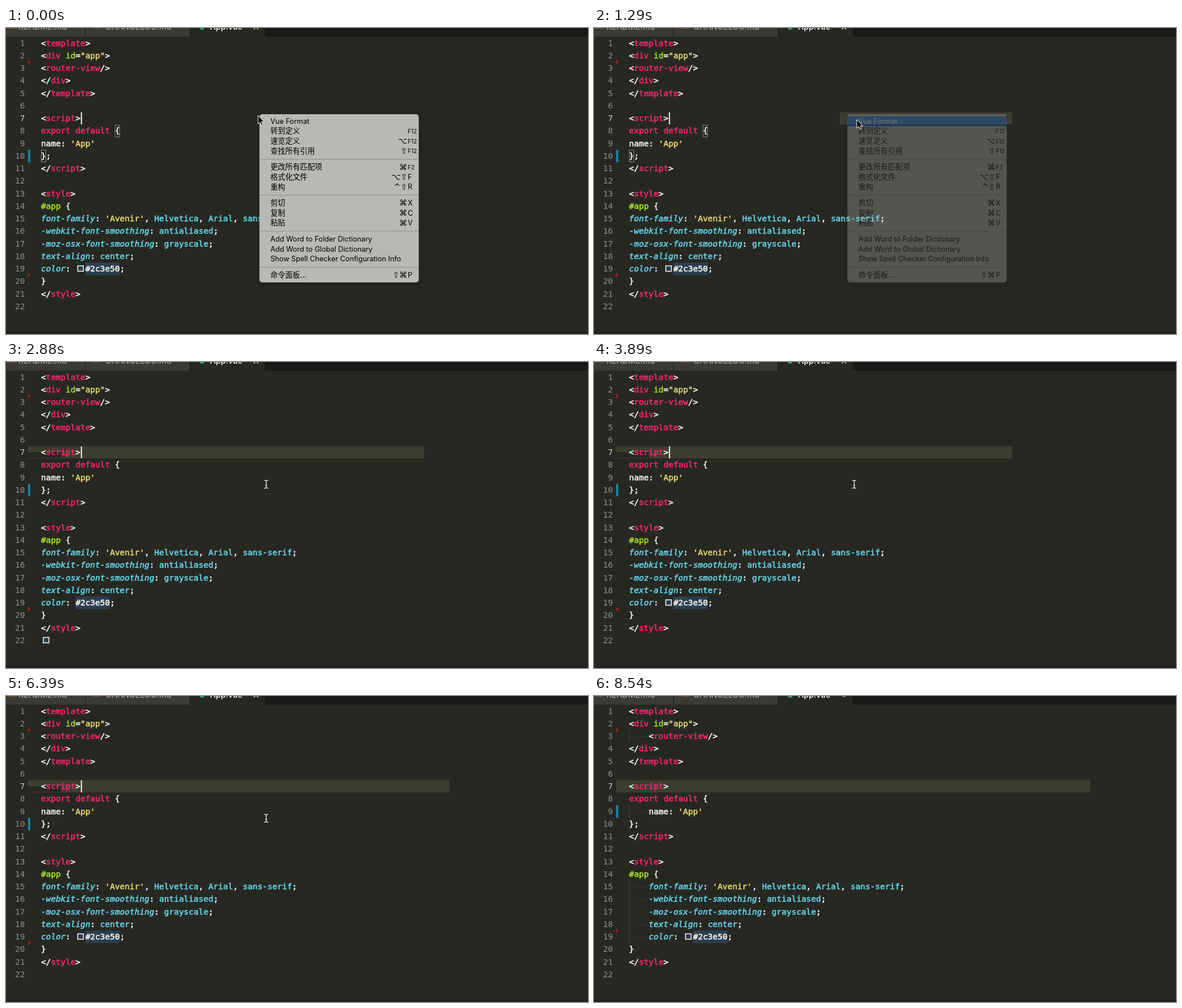
An HTML page for the animation above (8640 ms loop, 1030 px wide and 543 px high).

```html
<!DOCTYPE html>
<html lang="zh">
<head>
<meta charset="utf-8">
<title>Editor formatting</title>
<style>
html, body { margin: 0; width: 100%; height: 100%; overflow: hidden; background: #272822; }
svg { display: block; width: 1030px; height: 543px; }
text { white-space: pre; }
.code { font: 14.47px "DejaVu Sans Mono", monospace; stroke-width: .55px; }
.num { font: 14.47px "DejaVu Sans Mono", monospace; fill: #8f908a; text-anchor: end; }
.tab { font: 500 14.3px Inter, sans-serif; }
.ui { font: 12.65px Inter, sans-serif; }
.cjk { font: 13.1px "Noto Sans CJK SC", "Noto Sans CJK", sans-serif; }
.mod { font: 14px "DejaVu Sans", sans-serif; text-anchor: end; }
.fkey { font: 10px Inter, sans-serif; }
.w { fill: #f8f8f2; stroke: #f8f8f2 }
.p { fill: #f92672; stroke: #f92672 }
.g { fill: #a6e22e; stroke: #a6e22e }
.y { fill: #e6db74; stroke: #e6db74 }
.b, .i { fill: #66d9ef; stroke: #66d9ef }
.i { font-style: italic }
</style>
</head>
<body>
<svg viewBox="0 0 1030 543">
  <rect y="538" width="1030" height="5" fill="#22231e"/>
  <rect width="1030" height="15.5" fill="#191a17"/>
  <rect width="140" height="15.5" fill="#3a3b35"/>
  <rect x="141" width="184" height="15.5" fill="#3a3b35"/>
  <rect x="326" width="132" height="16" fill="#272822"/>
  <path d="M3 0H16M155 0H168" stroke="#8a5a3c" stroke-width="2"/>
  <circle cx="347" cy="-1" r="4" fill="#3aa579"/>
  <g class="tab" fill="#a3a49c">
    <text x="22" y="2.6">README.md</text>
    <text x="176" y="2.6">CHANGELOG.md</text>
    <text x="361" y="2.6" fill="#fff">App.vue</text>
  </g>
  <path id="close" d="M438.5 2.5L446.5-5.5M446.5 2.5L438.5-5.5" stroke="#d0d0ca" stroke-width="1.5"/>
  <circle id="dirty" cx="442.5" cy="-3" r="4.5" fill="#a0a09a"/>
  <g id="light" fill="#3e3d32"></g>
  <g id="code"></g>
  <rect id="caret" y="149.5" width="2" height="21.5" fill="#f8f8f0"/>
  <g id="palette"></g>
  <g id="menu"></g>
  <path id="arrow" d="M0 0V15.5L3.6 12.2L6 17.6L8.4 16.6L6.1 11.3H10.8Z" fill="#000" stroke="#fff"/>
  <path id="beam" d="M-3.5-7Q0-7 0-5Q0-7 3.5-7M0-5V5M-3.5 7Q0 7 0 5Q0 7 3.5 7M-1.5 2H1.5" fill="none" stroke="#e8e8e4" stroke-width="1.3"/>
</svg>
<script>
const $ = id => document.getElementById(id);
const LEFT = 62, CHAR = 8.711, ROW = 22.24, LOOP = 8640;
const rowTop = n => 15.9 + (n - 1) * ROW;
const esc = s => s.replace(/&/g, "&amp;").replace(/</g, "&lt;");
const text = (x, y, cls, s, more = "") => `<text x="${x}" y="${y}" class="${cls}" ${more}>${esc(s)}</text>`;
const rect = (x, y, w, h, more = "") => `<rect x="${x}" y="${y}" width="${w}" height="${h}" ${more}/>`;
const show = (id, on) => $(id).style.display = on ? "" : "none";

// "~c" sets the colour class; ~s is a swatch slot, ~h a highlighted colour value
const lines = [
  "<~ptemplate~w>",
  "<~pdiv ~gid~w=~y\"app\"~w>",
  "<~prouter-view~w/>",
  "</~pdiv~w>",
  "</~ptemplate~w>",
  "",
  "<~pscript~w>",
  "~pexport default ~w{",
  "name: ~y'App'",
  "};",
  "</~pscript~w>",
  "",
  "<~pstyle~w>",
  "~g#app ~w{",
  "~ifont-family~w: ~y'Avenir'~w, ~bHelvetica~w, ~bArial~w, ~bsans-serif~w;",
  "~i-webkit-font-smoothing~w: ~bantialiased~w;",
  "~i-moz-osx-font-smoothing~w: ~bgrayscale~w;",
  "~itex~s~it-align~w: ~bcenter~w;",
  "~icolor~w: ~s~h#2c3e50~w;",
  "}",
  "</~pstyle~w>",
  "~s"
];
const indented = n => n === 3 || n === 9 || (n > 14 && n < 20);

function codeMarkup(formatted, swatch, brackets) {
  let out = "";
  lines.forEach((line, k) => {
    const n = k + 1, top = rowTop(n), base = (top + 15.8).toFixed(1);
    let col = 0;
    out += text(33.5, base, "num", "" + n, n === 7 ? 'style="fill:#d0d0cb"' : "");
    if (formatted && indented(n)) {
      out += rect(62, top, 1, ROW, 'fill="#4b4c43"');
      for (; col < 4; col++) out += rect(LEFT + (col + .5) * CHAR, top + 11, 1.5, 1.5, 'fill="#55564d"');
    }
    const parts = ("~w" + line).split(/~(.)/).slice(1);
    for (let j = 0; j < parts.length; j += 2) {
      const cls = parts[j], s = parts[j + 1], x = +(LEFT + col * CHAR).toFixed(2);
      if (cls === "s") {
        if (swatch !== n) continue;
        out += rect(x + 4, top + 5.8, 10, 9.6, 'fill="#2c3e50" stroke="#eee" stroke-width="1.6"');
        col += 2;
      }
      if (cls === "h") out += rect(x, top, 7 * CHAR, ROW, 'fill="#2c3e50"');
      if (s) out += text(x, base, "code " + (cls === "h" ? "w" : cls), s);
      col += s.length;
    }
  });
  const frame = 'fill="none" stroke="#888980"';
  if (brackets) out += rect(193, rowTop(8) + .6, 8, 21, frame) + rect(62.5, rowTop(10) + .6, 8, 21, frame);
  out += rect(39, rowTop(formatted ? 9 : 10), 4, ROW, 'fill="#1b809e"');
  for (const y of [60.5, formatted ? 416 : 438.3])
    out += `<path d="M39 ${y - 4}L43.5 ${y}L39 ${y + 4}Z" fill="#a31d1d"/>`;
  return out;
}

// centre y, label, modifiers, key
const items = [
  [165, "Vue Format"], [182.5, "转到定义", "", "F12"], [200, "速览定义", "⌥", "F12"], [217.7, "查找所有引用", "⇧", "F12"],
  [246.5, "更改所有匹配项", "⌘", "F2"], [264, "格式化文件", "⌥⇧", "F"], [281.7, "重构", "^⇧", "R"],
  [310.3, "剪切", "⌘", "X"], [328, "复制", "⌘", "C"], [345.6, "粘贴", "⌘", "V"],
  [374.5, "Add Word to Folder Dictionary"], [392, "Add Word to Global Dictionary"],
  [409.6, "Show Spell Checker Configuration Info"], [438.2, "命令面板...", "⇧⌘", "P"]
];
const label = (x, y, s, more) => text(x, y + 4.8, /^[A-Z]/.test(s) ? "ui" : "cjk", s, more);

$("menu").innerHTML =
  rect(448.5, 153, 282, 298.5, 'rx="5" fill="#b8b9b5" style="filter:drop-shadow(0 2px 4px #0006)"') +
  rect(448.5, 156.3, 282, 17.8, 'id="pick" fill="#0a66d4"') +
  [233, 296.5, 360.5, 424.6].map(y => rect(449, y - .8, 281, 1.6, 'fill="#9c9d99"')).join("") +
  items.map(([y, s, mods, key], k) => label(468, y, s, k ? "" : 'id="first"') +
    (key ? text(710, y + 5, "mod", mods) + text(711, y + 4.6, key[1] ? "fkey" : "ui", key) : "")).join("");

$("palette").innerHTML =
  rect(108, -30, 667, 404, 'fill="#1e1f1c" style="filter:drop-shadow(0 3px 4px #000)"') +
  rect(117, -20, 649, 28, 'fill="#414339"') +
  text(121, 4, "tab", ">", 'fill="#f8f8f2"') +
  rect(133, 0, 1.3, 6, 'id="blink" fill="#f8f8f0"') +
  rect(108, 15.5, 667, 24.5, 'id="focus" fill="#414339"') +
  items.map(([, s], k) => label(120, 27.8 + k * 24.5, s, 'fill="#ccccc7"')).join("");

const path = [
  [30, 446, 155], [390, 465, 162.5], [1460, 465, 162.5], [1930, 462, 202],
  [2230, 460.5, 217], [7520, 460.5, 217], [7820, 878, 555]
];
function pointer(t) {
  const k = path.findIndex(p => p[0] > t);
  if (k < 0) return path.at(-1).slice(1);
  if (!k) return path[0].slice(1);
  const [a, x, y] = path[k - 1], [b, u, v] = path[k], f = (t - a) / (b - a);
  return [x + (u - x) * f, y + (v - y) * f];
}

// full-width current-line band, uncovered piece by piece
function band(t) {
  const bar = (a, b, top = 149.5, h = 21.5) => rect(a, top, b - a, h);
  if (t < 1170) return "";
  if (t < 1230) return rect(443, 151, 293, 20, 'opacity=".4"');
  if (t < 1580) return bar(435, 740);
  const right = t < 6330 ? 740 : t < 7640 ? 785 : 878;
  if (t >= 6450) return bar(39, right);
  return bar(39, 97, 149.5, 10.5) + bar(39, 97, 170, 1) + bar(t < 2520 ? 133 : 97, right);
}

const within = (t, ...spans) => spans.some(([a, b]) => t >= a && t < b);
const cache = {};
function fill(id, key, make) {
  if (cache[id] === key) return;
  cache[id] = key;
  $(id).innerHTML = make();
}

function render(t) {
  const formatted = within(t, [1580, 2880], [6450, LOOP]);
  const swatch = within(t, [1580, 2520], [6450, 7340]) ? 18 : within(t, [2880, 3890]) ? 22 : 19;
  const brackets = t < 1580;
  fill("code", [formatted, swatch, brackets].join(), () => codeMarkup(formatted, swatch, brackets));
  const light = band(t);
  fill("light", light, () => light);
  show("close", !formatted);
  show("dirty", formatted);

  $("caret").setAttribute("x", formatted ? 96.3 : 132.5);
  show("caret", !within(t, [2050, 2520], [3360, 3830], [6870, 7340], [7820, 8360], [8540, LOOP]));

  const picked = within(t, [180, 1050], [1110, 1350]);
  $("menu").setAttribute("opacity", Math.max(0, Math.min(1, (1350 - t) / 190)));
  show("pick", picked);
  $("first").setAttribute("fill", picked ? "#fff" : "#000");

  show("palette", within(t, [4600, 6330]));
  show("blink", !within(t, [5500, 6040]));
  show("focus", t >= 4900);

  const at = `translate(${pointer(t)})`;
  $("arrow").setAttribute("transform", at);
  $("beam").setAttribute("transform", at);
  show("arrow", t < 1520);
  show("beam", t >= 1520 && t < 7820);
}

const start = performance.now();
function tick() {
  render((performance.now() - start) % LOOP);
  requestAnimationFrame(tick);
}
tick();
</script>
</body>
</html>
```
